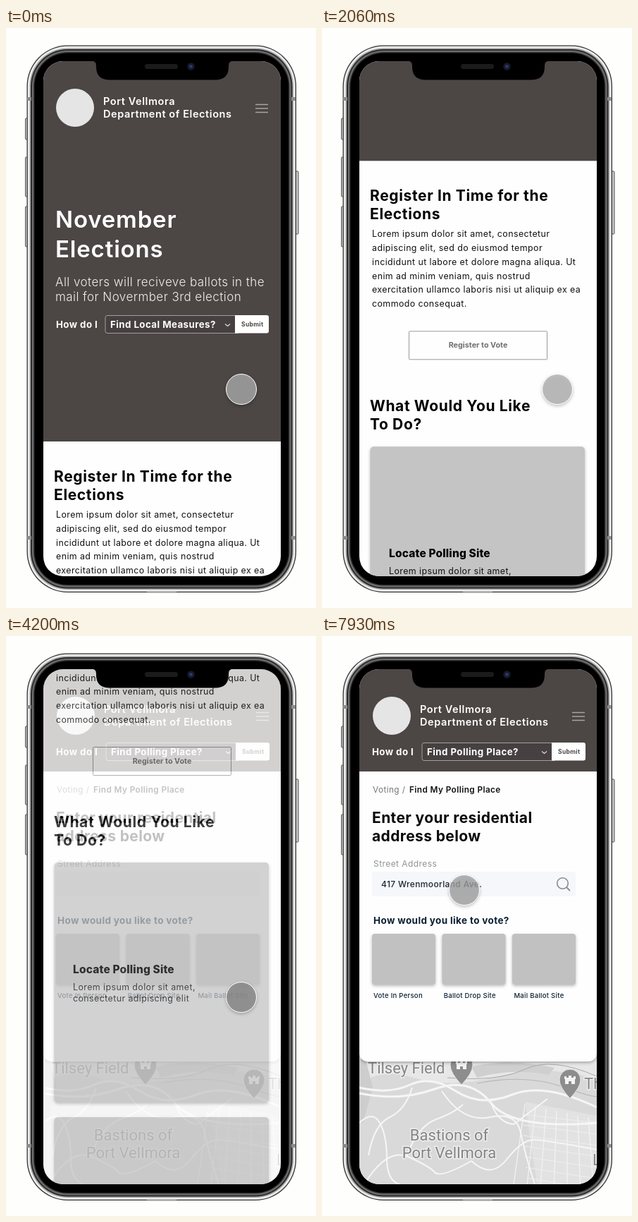
Write an HTML page that moves like this. It is 440 px wide and 822 px high and loops after 8000 ms.

```html
<!DOCTYPE html>
<html lang="en">
<head>
<meta charset="utf-8">
<title>Voting prototype</title>
<style>
  html, body { margin: 0; width: 100%; height: 100%; overflow: hidden; background: #fefefd; }
  svg { display: block; width: 100%; height: 100%; }
  text { font-family: Inter, "Open Sans", sans-serif; white-space: pre; }
  .brand { font-size: 14.5px; font-weight: 600; letter-spacing: .04em; fill: #fff; }
  .hero { font-size: 33px; font-weight: 600; letter-spacing: .025em; fill: #fff; }
  .lead { font-size: 17px; font-weight: 300; letter-spacing: .026em; fill: #f2f0f0; }
  .ask { font-size: 13.3px; font-weight: 700; letter-spacing: .033em; fill: #fff; }
  .submit { font-size: 8.5px; font-weight: 700; letter-spacing: .04em; fill: #4c4644; }
  .title { font-size: 21px; font-weight: 700; letter-spacing: .03em; fill: #000; }
  .prompt { font-size: 21px; font-weight: 700; letter-spacing: .018em; fill: #0a0a0a; }
  .body { font-size: 12.4px; letter-spacing: .034em; fill: #111; }
  .button { font-size: 10.8px; font-weight: 700; fill: #707070; text-anchor: middle; }
  .card { font-size: 15.5px; font-weight: 800; letter-spacing: .01em; fill: #000; }
  .crumb { font-size: 11.8px; letter-spacing: .034em; fill: #777; }
  .here { font-size: 11.8px; font-weight: 600; letter-spacing: .034em; fill: #111; }
  .label { font-size: 12px; letter-spacing: .036em; fill: #929292; }
  .question { font-size: 13.5px; font-weight: 700; letter-spacing: .027em; fill: #0b1f33; }
  .choice { font-size: 9.5px; font-weight: 500; letter-spacing: .03em; fill: #0b1f33; }
  .typed { font-size: 12px; font-weight: 500; letter-spacing: .03em; fill: #1b2733; }
  .map { font-family: Roboto, sans-serif; font-size: 22px; fill: #858585; stroke: #eee; stroke-width: 3px; paint-order: stroke; }
  .raised { filter: drop-shadow(0 2px 2px rgba(0, 0, 0, .28)); }
</style>
</head>
<body>
<svg id="stage" viewBox="0 0 440 822" preserveAspectRatio="none"></svg>
<script>
const DURATION = 8000;
const DARK = '#4c4644';

const rect = (x, y, w, h, fill, r = 0, extra = '') =>
  `<rect x="${x}" y="${y}" width="${w}" height="${h}" rx="${r}" fill="${fill}" ${extra}/>`;
const circle = (x, y, r, fill, extra = '') =>
  `<circle cx="${x}" cy="${y}" r="${r}" fill="${fill}" ${extra}/>`;
const line = (d, color, width, extra = '') =>
  `<path d="${d}" fill="none" stroke="${color}" stroke-width="${width}" ${extra}/>`;
const text = (style, x, y, ...rows) => {
  const gap = { brand: 18, hero: 42, lead: 21, title: 26, prompt: 25.5, card: 16, body: 19.8, map: 25 }[style] || 0;
  return rows.map((row, i) => `<text class="${style}" x="${x}" y="${y + i * gap}">${row}</text>`).join('');
};

function banner(x, y, question) {
  return circle(x + 98, 113, 27, '#e5e5e5') +
    text('brand', x + 138, 108.5, 'Port Vellmora', 'Department of Elections') +
    line(`M${x + 354} 108.5h18m-18 5.5h18m-18 5.5h18`, '#a6a2a1', 1.4) +
    text('ask', 71, y + 17.5, 'How do I') +
    rect(x + 141, y + .5, 190, 25, '#464140', 3, 'stroke="#a39f9e"') +
    text('ask', x + 148, y + 18, question) +
    line(`M${x + 311} ${y + 12.5}l3.5 3 3.5-3`, '#ddd', 1.2) +
    rect(x + 325, y, 48, 25.5, '#fff', 3) + rect(x + 325, y, 4, 25.5, '#fff') +
    text('submit', x + 334, y + 15.5, 'Submit');
}

function homePage() {
  return rect(53, 47, 337, 1700, '#fefefe') + rect(53, 0, 337, 586, DARK) +
    banner(0, 407, 'Find Local Measures?') +
    text('hero', 70, 283, 'November', 'Elections') +
    text('lead', 70, 366, 'All voters will reciveve ballots in the', 'mail for Novermber 3rd election') +
    text('title', 68, 643, 'Register In Time for the', 'Elections') +
    text('body', 71, 694, 'Lorem ipsum dolor sit amet, consectetur', 'adipiscing elit, sed do eiusmod tempor',
      'incididunt ut labore et dolore magna aliqua. Ut', 'enim ad minim veniam, quis nostrud',
      'exercitation ullamco laboris nisi ut aliquip ex ea', 'commodo consequat.') +
    rect(123.5, 827.5, 196, 40, '#fefefe', 1, 'stroke="#999"') +
    text('button', 221.5, 851, 'Register to Vote') +
    text('title', 68, 941, 'What Would You Like', 'To Do?') +
    rect(68.5, 991, 304.5, 340, '#c4c4c4', 5, 'class="raised"') +
    text('card', 95, 1148, 'Locate Polling Site') +
    text('body', 95, 1171.5, 'Lorem ipsum dolor sit amet,') +
    text('body', 95, 1187.5, 'consectetur adipiscing elit') +
    rect(68.5, 1352, 304.5, 340, '#c4c4c4', 5, 'class="raised"');
}

function pin(x, y, r) {
  return `<path d="M${x - r} ${y}a${r} ${r} 0 1 1 ${2 * r} 0q0 ${r * .7}-${r} ${r * 1.75}q-${r}-${r * 1.05}-${r}-${r * 1.75}" fill="#8d8d8d" stroke="#e6e6e6"/>` +
    `<path d="M${x - 7} ${y + 6}v-7h-1v-4h3v2h3v-3h4v3h3v-2h3v4h-1v7h-5v-4h-4v4z" fill="#f4f4f4"/>`;
}

function map() {
  const roads = [
    'M53 640Q95 650 125 636T190 645T270 650T390 668',
    'M53 648Q110 660 160 642T240 662T390 690',
    'M53 690Q72 672 82 690T92 740T110 777',
    'M60 777Q92 725 122 738T160 760T212 744',
    'M128 640Q118 672 96 682T66 736',
    'M170 645Q200 690 238 682T282 704T302 777',
    'M240 662Q250 690 272 692L320 656',
    'M212 744Q240 770 262 742T300 714T390 728',
    'M120 738Q135 695 162 685T200 664'
  ];
  let streets = '';
  for (let i = 0; i < 7; i++) {
    streets += line(`M${288 + i * 15} ${664 + i * 3}l${-16 + i * 4} 113`, '#f3f3f3', 1.2);
    streets += line(`M${284 + i} ${678 + i * 15}l106 ${12 + i}`, '#eee', 1);
  }
  return rect(53, 580, 337, 200, '#d9d9d9') +
    '<path d="M53 580H390V628Q320 606 250 624T130 626T53 638Z" fill="#e7e7e7"/>' +
    '<path d="M212 610Q270 598 330 612L322 622Q270 612 220 626Z" fill="#cfcfcf"/>' +
    '<path d="M53 600L62 600L72 640L58 690L53 690Z" fill="#cdcdcd"/>' +
    '<path d="M288 660L390 680V777H305Z" fill="#e2e2e2"/>' +
    streets +
    roads.map((d, i) => line(d, '#f6f6f6', i < 2 ? 3 : 2)).join('') +
    line('M220 634Q290 620 345 640T390 648', '#b7b7b7', 1.2) +
    line('M178 626Q250 632 288 614T390 624', '#aaa', 1) +
    pin(198, 608, 16) + pin(352, 629, 15) +
    text('map', 65, 620, 'Tilsey Field') + text('map', 372, 642, 'Th') + text('map', 384, 750, 'L') +
    `<g text-anchor="middle">${text('map', 180.5, 715, 'Bastions of', 'Port Vellmora')}</g>`;
}

function pollingPage() {
  const choices = ['Vote In Person', 'Ballot Drop Site', 'Mail Ballot Site'];
  return map() +
    rect(53, 160, 337, 443, '#fefefe', 12, 'class="raised"') +
    rect(53, 40, 337, 152, DARK) +
    banner(1, 151, 'Find Polling Place?') +
    text('crumb', 72, 221.5, 'Voting /') + text('here', 124, 221.5, 'Find My Polling Place') +
    text('prompt', 71, 265, 'Enter your residential', 'address below') +
    text('label', 73, 327, 'Street Address') +
    rect(71, 334, 289, 35, '#f5f7fa', 3) +
    `<g id="answer">${text('typed', 84, 356, '417 Wrenmoorland Ave.')}${
      circle(341.5, 350.5, 7.8, 'none', 'stroke="#8a8a8a" stroke-width="1.6"')}${
      line('M347 356l5 5', '#8a8a8a', 1.8)}</g>` +
    text('question', 73, 408, 'How would you like to vote?') +
    choices.map((name, i) => rect(71 + i * 99.5, 422, 90, 72, '#c1c1c1', 4, 'class="raised"') +
      text('choice', 73 + i * 99.7, 512.5, name)).join('');
}

function phone() {
  const rings = [[0, '#333'], [1.3, '#ececec'], [4, '#a9a9a9'], [5.5, '#2c2c2c'], [7.5, '#6f6f6f'], [9.5, '#333'], [11, '#000']];
  const buttons = [[27, 128, 30], [27, 183, 56], [27, 253, 57], [410.5, 203, 89]];
  const bands = [[30, 98], [30, 720], [405, 98], [405, 720]];
  return buttons.map(([x, y, h]) => rect(x + .5, y, 4, h, '#c9c9c9', 1, 'stroke="#555"')).join('') +
    rings.map(([inset, fill]) =>
      rect(29.5 + inset, 24.5 + inset, 382.5 - 2 * inset, 775.5 - 2 * inset, fill, 58 - inset)).join('') +
    bands.map(([x, y]) => rect(x, y, 6, 5, '#8b8b8b')).join('') +
    rect(200, 799, 42, 1.5, '#999');
}

const notch =
  '<path d="M121 46.5Q128 46.5 128 53V55Q128 73.5 147 73.5H297Q316 73.5 316 55V53Q316 46.5 323 46.5Z"/>' +
  rect(197, 51, 47, 7, '#1b1b1b', 3.5) + circle(262.5, 54.5, 5.2, '#161a2c') + circle(262.5, 54.5, 2.3, '#2c3a70');

const stage = document.getElementById('stage');
stage.innerHTML =
  `<clipPath id="screen">${rect(53, 47, 337, 730, '#000', 28)}</clipPath>` +
  phone() +
  `<g clip-path="url(#screen)"><g id="home">${homePage()}</g><g id="polling">${pollingPage()}</g></g>` +
  notch +
  circle(0, 0, 21.5, '#b2b2b2', 'id="cursor" class="raised" fill-opacity=".76" stroke="#fff"');

const [home, polling, answer, cursor] =
  ['home', 'polling', 'answer', 'cursor'].map(id => document.getElementById(id));

const progress = (t, from, to) => Math.min(1, Math.max(0, (t - from) / (to - from)));
const easeOut = p => 1 - (1 - p) ** 2;
const easeInOut = p => p < .5 ? 2 * p * p : 1 - 2 * (1 - p) ** 2;

// Scroll offsets over time, joined by a monotone cubic.
const stops = [[0, 0], [1600, 361.5], [2600, 442.5], [3130, 659], [3500, 670]];
const slopes = stops.slice(1).map(([t, y], i) => (y - stops[i][1]) / (t - stops[i][0]));
const speeds = stops.map((_, i) =>
  i && i < slopes.length ? 2 / (1 / slopes[i - 1] + 1 / slopes[i]) : 0);

function scrollAt(t) {
  const i = stops.findIndex(stop => stop[0] > t) - 1;
  if (i < 0) return stops[stops.length - 1][1];
  const [t0, y0] = stops[i], [t1, y1] = stops[i + 1];
  const span = t1 - t0, p = (t - t0) / span, q = 1 - p;
  return y0 * q * q * (1 + 2 * p) + y1 * p * p * (3 - 2 * p) +
    span * p * q * (speeds[i] * q - speeds[i + 1] * p);
}

function draw(t) {
  home.setAttribute('transform', `translate(0 ${-scrollAt(t)})`);
  polling.setAttribute('opacity', easeOut(progress(t, 4090, 4930)));
  answer.setAttribute('opacity', easeOut(progress(t, 7060, 7930)));

  const move = easeInOut(progress(t, 4700, 6660));
  cursor.setAttribute('transform', `translate(${334 - 132 * move} ${512 - 152 * move})`);

  const press = progress(t, 3800, 3930) - progress(t, 4800, 5000) +
    progress(t, 6700, 6830) - progress(t, 7800, 8000);
  const shade = Math.round(178 - 42 * press);
  cursor.setAttribute('fill', `rgb(${shade},${shade},${shade})`);
}

let start;
function tick(now) {
  start ??= now;
  draw((now - start) % DURATION);
  requestAnimationFrame(tick);
}
draw(0);
requestAnimationFrame(tick);
</script>
</body>
</html>
```
